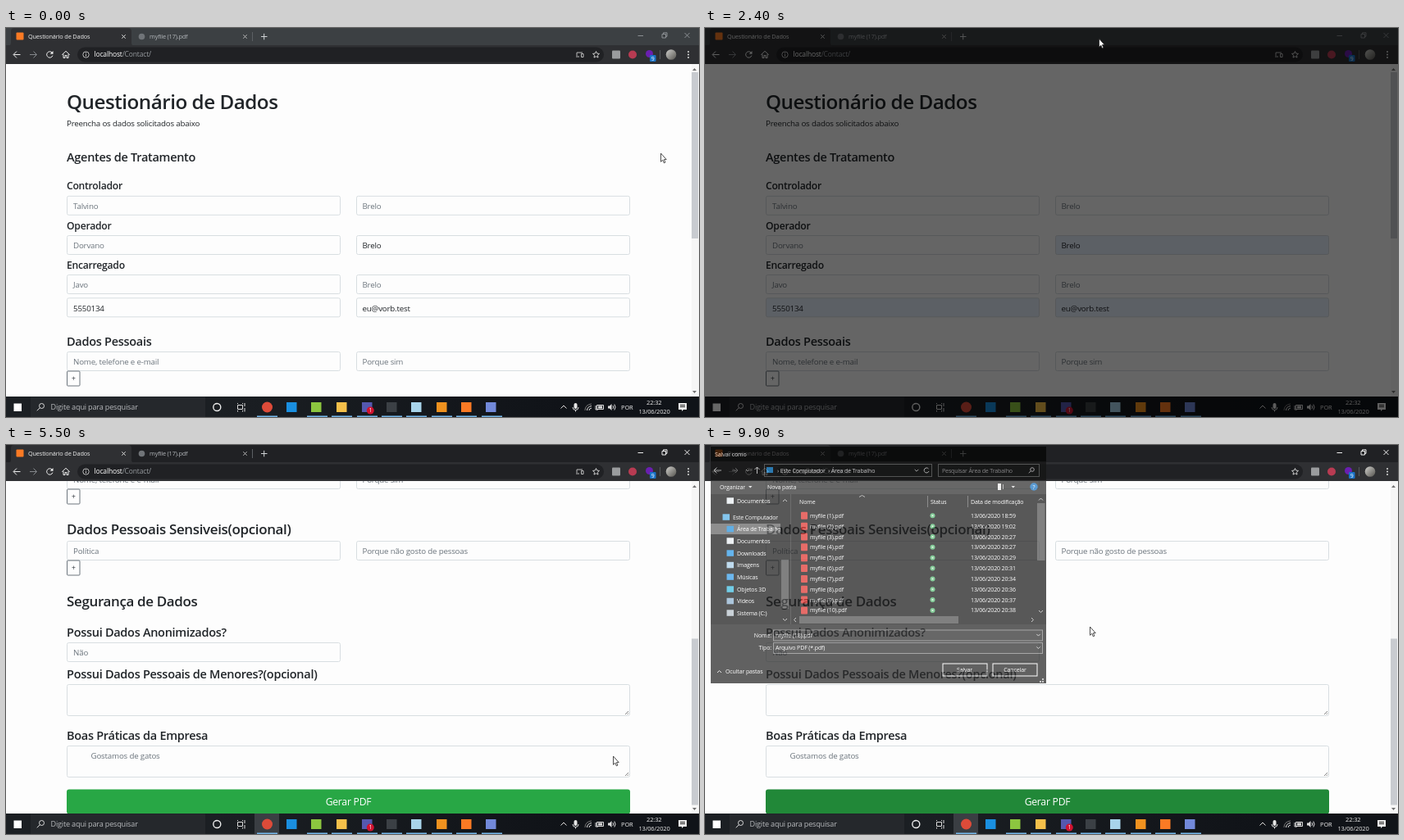
These frames come from a looping animation (845 px wide and 475 px high, 10 s). An HTML page:

```html
<!DOCTYPE html>
<html lang="pt">
<head>
<meta charset="utf-8">
<title>Questionário de Dados</title>
<style>
html, body { margin: 0; width: 100%; height: 100%; overflow: hidden; background: #fdfdfd; }
svg { display: block; width: 845px; height: 475px; }
text { font-family: "Open Sans", "Noto Sans", sans-serif; letter-spacing: -.02em; white-space: pre; }
.line { fill: none; stroke: currentColor; stroke-width: 1; }
.box { fill: #fdfdfd; stroke: #d8dee1; stroke-width: 1; }
</style>
</head>
<body>
<svg id="stage" viewBox="0 0 845 475"></svg>
<script>
const LOOP = 10000, STEP = 100;

// ---- drawing helpers ----
const rect = (x, y, w, h, fill, more = '') =>
  `<rect x="${x}" y="${y}" width="${w}" height="${h}" fill="${fill}" ${more}/>`;
const dot = (x, y, r, fill, more = '') => `<circle cx="${x}" cy="${y}" r="${r}" fill="${fill}" ${more}/>`;
const line = (d, color = '#ddd', more = '') => `<path class="line" d="${d}" color="${color}" ${more}/>`;
const shape = (d, fill, more = '') => `<path d="${d}" fill="${fill}" ${more}/>`;
const group = (id, body, more = '') => `<g id="${id}" ${more}>${body}</g>`;
// y is the middle of the text line
const text = (x, y, s, size, fill, more = '') => {
  const px = size * .985;
  return `<text x="${x}" y="${(y + px * .36).toFixed(2)}" font-size="${px.toFixed(2)}" fill="${fill}" ${more}>${s}</text>`;
};
const heading = (y, s, size) => text(74, y, s, size * .995, '#212529', 'font-weight="600"');
const cross = (x, y, r, color, more) => line(`M${x - r} ${y - r}l${2 * r} ${2 * r}m0 ${-2 * r}l${-2 * r} ${2 * r}`, color, more);
const chevron = (x, y, w, h, color) => line(`M${x - w} ${y - h / 2}l${w} ${h}l${w} ${-h}`, color);
const middle = 'text-anchor="middle"';

// ---- web page ----
const GREY = '#6c757d', DARK = '#212529';
const field = (col, y, s, auto) =>
  `<rect class="box${auto ? ' auto' : ''}" x="${col ? 427.5 : 74.5}" y="${y}" width="333" height="23" rx="2"/>` +
  text(col ? 434.5 : 82, y + 12.3, s, 9.9, auto ? DARK : GREY);
const pair = (y, a, b, autoA, autoB) => field(0, y, a, autoA) + field(1, y, b, autoB);
const plus = y => `<rect x="74.5" y="${y}" width="15.5" height="18" rx="1" fill="#fdfdfd" stroke="#6c757d"/>` +
  text(82.3, y + 9.3, '+', 8.7, '#343a40', middle);
const area = (y, s) => `<rect class="box" x="74.5" y="${y}" width="686" height="38" rx="2"/>` +
  text(103.5, y + 12, s, 9.9, GREY) + line(`M755 ${y + 36.5}l4-4m-1.5 4l1.5-1.5`, '#888', 'stroke-width=".7"');

const page = group('page',
  heading(90, 'Questionário de Dados', 24.7) +
  text(74, 116, 'Preencha os dados solicitados abaixo', 9.9, DARK) +
  heading(157.5, 'Agentes de Tratamento', 14.8) +
  heading(193, 'Controlador', 12.4) + pair(205.3, 'Talvino', 'Brelo') +
  heading(241.5, 'Operador', 12.4) + pair(253.5, 'Dorvano', 'Brelo', false, true) +
  heading(289.5, 'Encarregado', 12.4) + pair(301.5, 'Javo', 'Brelo') +
  pair(329.8, '5550134', 'eu@vorb.test', true, true) +
  heading(382.5, 'Dados Pessoais', 14.8) + pair(395.5, 'Nome, telefone e e-mail', 'Porque sim') + plus(419) +
  heading(468.3, 'Dados Pessoais Sensiveis(opcional)', 17.3) + pair(482.5, 'Política', 'Porque não gosto de pessoas') + plus(506) +
  heading(555.5, 'Segurança de Dados', 17.3) +
  heading(594, 'Possui Dados Anonimizados?', 14.8) + field(0, 606.5, 'Não') +
  heading(644.7, 'Possui Dados Pessoais de Menores?(opcional)', 14.8) + area(657.5, '') +
  heading(720, 'Boas Práticas da Empresa', 14.8) + area(732.5, 'Gostamos de gatos') +
  `<rect id="button" x="74" y="785.5" width="687" height="30" rx="3"/>` +
  text(417.5, 801, 'Gerar PDF', 12.4, '#fff', middle));

const scrollbar = rect(836, 44, 9, 406, '#f6f6f6') + `<rect id="thumb" x="836" width="8" height="203"/>` +
  shape('M837 52l2.5-3l2.5 3zM837 443l2.5 3l2.5-3z', '#707070');

// ---- browser frame ----
const arrow = (x, dir, color) => line(`M${x - 4} 32.5h8M${x + dir * .5} 28.5l${dir * 4} 4l${-dir * 4} 4`, color, 'stroke-width="1.3"');
const browser = `<rect id="strip" width="845" height="22"/>` + rect(0, 21, 845, 23, '#2f3033') +
  shape('M2 22q4 0 4-4V4q0-4 4-4H149q4 0 4 4v14q0 4 4 4z', '#2f3033') +
  group('favicon', rect(12.5, 5.5, 9, 9, '#fb7a24', 'rx="1"')) +
  text(27, 10.5, 'Questionário de Dados', 7.42, '#f0f0f0') + cross(143.5, 10.5, 2.2, '#ddd') +
  dot(165.5, 10.5, 3.8, '#707478') + text(175, 10.5, 'myfile (17).pdf', 7.42, '#b4b8bc') + cross(291.5, 10.5, 2.2, '#bbb') +
  line('M300.5 5v11', '#5c6064') + line('M311 10.5h7.5M314.7 6.8v7.5', '#d0d3d6') +
  group('controls', line('M770.5 9.5h6.5M800 7.5h4.5v4.5h-4.5zM801.5 7.5v-1.7h4.5v4.5h-1.5', 'currentColor', 'stroke-width=".9"') + cross(830.5, 9, 3, 'currentColor')) +
  arrow(13.5, -1, '#eee') + arrow(33, 1, '#85888c') +
  group('reload', line('M56.3 30.2a3.7 3.7 0 1 0 .6 3.4', '#eee', 'stroke-width="1.3"') + shape('M57.5 28v3.8h-3.8z', '#eee')) +
  group('stop', cross(53, 32.5, 3, '#eee', 'stroke-width="1.3"')) +
  line('M68.3 32.7l4.7-4.4l4.7 4.4M70 32v4.5h2v-3h2v3h2V32', '#eee', 'stroke-width="1.2"') +
  rect(87, 23.5, 642, 18, '#202124', 'rx="9"') +
  dot(97.5, 32.5, 3.7, 'none', 'stroke="#bbb"') + line('M97.5 32v2.5M97.5 30v1', '#ccc') +
  text(107.5, 32.3, '<tspan fill="#fff">localhost</tspan>/Contact/', 8.65, '#969a9e') +
  group('device', line('M696 34V30h7M695 35h4M701.5 31.5h2.5v4h-2.5z', '#bbb')) +
  line('M719.5 28.5l1.2 2.6l2.8.3l-2.1 1.9l.6 2.8l-2.5-1.4l-2.5 1.4l.6-2.8l-2.1-1.9l2.8-.3z', '#ccc', 'stroke-width=".9"') +
  rect(739, 27.5, 10, 10, '#9a9c9e', 'rx="1"') + dot(764, 32.5, 5, '#b83b52') +
  dot(784.5, 31.5, 4.5, '#6a1fb0') + rect(785, 33, 7.5, 8, '#1a73c8', 'rx="1"') + text(788.7, 37.2, '9', 7, '#fff', middle) +
  line('M797.5 27v11', '#55585b') + dot(811, 32.5, 6.3, 'url(#photo)') +
  [29, 32.5, 36].map(y => dot(832, y, 1, '#ddd')).join('');

// ---- taskbar ----
const apps = [[348, '#1a8fe0'], [378, '#8cc63f', 1], [409, '#f5c04a', 1], [440, '#5558af', 1], [470, '#3b4045', 1],
  [500, '#a8d4ea'], [531, '#f0921f', 1], [561, '#fb7a24'], [591, '#7289da', 1]];
const taskbar = rect(0, 450, 845, 25, 'url(#bar)') + rect(9.5, 458.5, 9.5, 9.5, '#fff') +
  rect(30, 450.5, 213, 24.5, '#25282c') + dot(43.5, 461.5, 3, 'none', 'stroke="#ddd"') + line('M41.3 463.8l-3.5 3.5') +
  text(54.5, 463, 'Digite aqui para pesquisar', 9.25, '#b8babd') +
  dot(257.3, 463, 4.5, 'none', 'stroke="#eee" stroke-width="1.4"') +
  line('M282.5 460.5h6v5h-6zM282.5 458v1M288.5 458v1M282.5 467v1.5M288.5 467v1.5M291 458v4M291 464v4.5', '#ddd') +
  group('active', rect(303, 450, 30, 25, '#3a3e43')) +
  dot(318.5, 463, 6.5, '#dd4b39') +
  apps.map(([x, c, late]) => rect(x - 6, 457, 12.5, 12, c, late ? 'class="late"' : '')).join('') +
  [306, 367, 397, 428, 458, 488, 519, 549, 580].map(x => rect(x, 473.5, 25, 1.5, '#76b9ed')).join('') +
  dot(444.3, 467, 4.5, '#d1122f') + text(444.3, 467, '1', 7, '#fff', middle) +
  line('M676.5 464.5l3.5-3.5l3.5 3.5') +
  rect(692.5, 458, 4, 7, '#e6e6e6', 'rx="2"') + line('M691 463q0 3.5 3.5 3.5t3.5-3.5M694.5 466.5v2') +
  line('M706 467q0-7 8-8', '#777') + line('M708.5 467q0-4.5 5.5-5.5M711 467q0-2.5 3-3') +
  line('M720.5 460.5h8v5h-8z') + rect(722, 461.5, 5, 3, '#ddd') + line('M719 461v5h3') +
  shape('M734 461.5h2l2.5-2.5v8l-2.5-2.5h-2z', '#ddd') + line('M740 461q1.5 2 0 4M741.8 459.5q2.5 3.5 0 7') +
  text(757.3, 463, 'POR', 7.6, '#eee', middle) + text(790.3, 457.2, '22:32', 7.6, '#eee', middle) +
  text(790.5, 468, '13/06/2020', 7.6, '#eee', middle) +
  shape('M820 458h10v8h-4l-2 2v-2h-4z', '#eee') + line('M822 460.5h6M822 462.5h6', '#222', 'stroke-width=".7"');

// ---- capture toolbar ----
const snip = group('snip', rect(348, 0, 149, 29.5, '#202020') + rect(348, 0, 30, 29.5, '#0078d7') +
  `<rect id="closeHot" x="467" width="30" height="29.5" fill="#e81123"/>` +
  line('M358.5 11.5h9.5v7.5h-9.5z', '#fff', 'stroke-dasharray="2 1"') + line('M366 19.5h4M368 17.5v4', '#fff') +
  line('M396.5 17.5a4.5 4.5 0 1 1 1-3M394 18l4 2', '#fff') +
  line('M418.5 10.5h6.5v7h-6.5zM427 12v8h-7', '#fff') +
  line('M447.5 13v-2h2m5 0h2v2m0 4v2h-2m-5 0h-2v-2M449.5 13h5v4h-5z', '#fff') +
  line('M467.5 8v13', '#666') + cross(482.3, 14.8, 3.6, '#fff'));

// ---- save dialog ----
const small = (x, y, s, more = '') => text(x, y, s, 7.15, '#fff', more);
const frame = (x, y, w, h, color = '#8a8a8a') => rect(x + .5, y + .5, w, h, 'none', `stroke="${color}"`);

const opening = group('opening',
  rect(5, 0, 412.5, 20, '#0a0a0a') + dot(15, 10, 4, '#dd4b39') + small(23.5, 10, 'Salvar como') + cross(407.5, 10, 3, '#fff') +
  rect(5, 20, 412.5, 40, '#fdfdfd') + rect(5, 60, 97, 159.5, 'rgba(16,16,16,.94)') +
  rect(102, 60, 2.5, 159.5, '#fdfdfd') + rect(104.5, 60, 313, 159.5, 'rgba(16,16,16,.87)') +
  rect(92, 140, 9, 61, '#4d4d4d') + rect(407, 60, 10, 138, '#222') + rect(407, 77, 10, 64, '#555') +
  rect(104.5, 208, 313, 11.5, '#202020') + rect(114, 209, 196, 9.5, '#555') +
  small(114.5, 68, 'Nome') + small(275, 68, 'Status') + small(324.5, 68, 'Data de modificação') + small(413, 68, 'T') +
  line('M271.5 62v14M320.5 62v14M409.5 62v14', '#666') + line('M188 62.5l3.5-2l3.5 2', '#aaa') +
  small(260, 90, 'Trabalhando nisso...', middle) +
  line('M94 67.5l2.5-2.5l2.5 2.5M94 213l2.5 2.5l2.5-2.5M111 211l-2.5 2.5l2.5 2.5M411 211l2.5 2.5l-2.5 2.5', '#bbb') +
  rect(26.5, 176, 7, 10, '#f4f4f4') + small(38, 181, 'tg') + small(33.5, 200.5, 'NuvemLar') +
  rect(26, 211, 8.5, 8.5, '#f7cf73') + small(38.5, 215.5, 'Anexos') +
  rect(5, 219.5, 412.5, 40.5, '#fdfdfd') + rect(5, 260, 412.5, 32, 'rgba(8,8,8,.72)') +
  rect(11.5, 271, 71.5, 13, '#fff') + rect(290.5, 268, 54, 16, '#fff') + rect(352, 268, 55, 16, '#fff') + rect(406, 281, 11, 10, '#fff') +
  frame(5, 0, 412, 292, '#8a9aa8'));

const places = [[68, 39, 'Documentos', '#e8eef2'], [88, 34, 'Este Computador', '#5ab4e8'], [102.5, 39, 'Área de Trabalho', '#2a93dc'],
  [117, 39, 'Documentos', '#e8eef2'], [132, 39, 'Downloads', '#2f9be8'], [146.5, 39, 'Imagens', '#a9cfe8'],
  [161, 39, 'Músicas', '#3aa0ea'], [176, 39, 'Objetos 3D', '#41bde0'], [190.5, 39, 'Vídeos', '#8fb2d0'], [205, 39, 'Sistema (C:)', '#b9c4cc']];
const times = ['18:59', '19:02', '20:27', '20:27', '20:29', '20:31', '20:34', '20:36', '20:37', '20:38'];
const files = times.map((clock, i) => {
  const y = 86.3 + i * 12.85;
  return rect(117, y - 4.5, 8, 9, '#e03a35', 'rx="1"') + small(128, y, `myfile (${i + 1}).pdf`) +
    dot(277.5, y, 3, '#5fbf7a') + dot(277.5, y, 1, '#e8f5ea') + small(324, y, `13/06/2020 ${clock}`);
}).join('');

const dialog = group('dialog',
  rect(7, 2, 409, 289, '#2b2b2b') + rect(7, 2, 409, 18, '#050505') + rect(7, 20, 409, 23, '#151515') +
  small(12, 11, 'Salvar como') + group('dialogClose', cross(405.5, 11, 3, '#fff')) +
  line('M20 31h-9m3.5-3.5l-3.5 3.5l3.5 3.5', '#ccc') + line('M33 31h7m-3-3l3 3l-3 3', '#777') +
  chevron(52, 31, 2, 2, '#aaa') + line('M63.5 35v-8m-3 3l3-3l3 3', '#eee') +
  frame(72, 23, 204, 15, '#666') + rect(75, 27, 8, 7, '#2a93dc') +
  small(88, 31, '› Este Computador&#160; › Área de Trabalho') + chevron(258, 31, 2.3, 2.3, '#ccc') +
  line('M272.5 29a3 3 0 1 0 .5 3', '#ddd') + frame(284, 23, 123, 15, '#666') +
  text(289, 31, 'Pesquisar Área de Trabalho', 7.15, '#aaa') + dot(399, 30, 2.3, 'none', 'stroke="#ccc"') + line('M397.3 31.8l-2.5 2.5', '#ccc') +
  rect(7, 43, 409, 17, '#333') + small(18, 51, 'Organizar') + shape('M53 50h4.5l-2.2 2.5z', '#ddd') + small(76, 51, 'Nova pasta') +
  rect(357, 47, 4, 8, '#eee') + line('M363.5 48v6', '#aaa') + shape('M373.5 50h4.5l-2.2 2.5z', '#ddd') +
  dot(401, 51, 4.7, '#2479c4') + small(401, 51, '?', middle) +
  rect(7, 60, 409, 159, '#202020') + rect(7, 96, 85, 13, '#686868') +
  `<g clip-path="url(#tree)">` + places.map(([y, x, s, c]) => rect(x - 12.5, y - 3.7, 8.5, 7.5, c) + small(x, y, s)).join('') + '</g>' +
  rect(93, 140, 9, 60, '#555') + line('M95 69l2.5-2.5l2.5 2.5M95 212l2.5 2.5l2.5-2.5', '#bbb') + line('M104.5 60v159', '#3c3c3c') +
  small(115, 69, 'Nome') + small(275, 69, 'Status') + small(324, 69, 'Data de modificação') +
  line('M271.5 62v14M320.5 62v14', '#666') + line('M188 63.5l3.5-2l3.5 2', '#aaa') + files +
  rect(405, 71, 9.5, 70, '#555') + rect(115, 209, 194, 9, '#555') +
  line('M407 67.5l2.5-2.5l2.5 2.5M407 202l2.5 2.5l2.5-2.5M111 211l-2.5 2.5l2.5 2.5M398 211l2.5 2.5l-2.5 2.5', '#bbb') +
  small(81, 232, 'Nome:', 'text-anchor="end"') + small(81, 247.5, 'Tipo:', 'text-anchor="end"') +
  rect(83, 226, 328, 13, '#333') + rect(83, 241.5, 328, 13, '#333') + frame(83, 225.5, 328, 13) + frame(83, 241, 328, 13) +
  small(86, 232, 'myfile (18).pdf') + small(86, 247.7, 'Arquivo PDF (*.pdf)') +
  chevron(406.5, 232, 2.2, 2.2, '#ccc') + chevron(406.5, 247.5, 2.2, 2.2, '#ccc') + `<path id="caret" d="M134.5 228v9" stroke="#fff" stroke-width=".8"/>` +
  line('M15 278l2.5-2.5l2.5 2.5', '#ddd') + small(25, 276.5, 'Ocultar pastas') +
  frame(289.5, 266.5, 54, 15, '#fff') + small(316.5, 274.3, 'Salvar', middle) +
  frame(350.5, 266.5, 54, 15, '#fff') + small(378, 274.3, 'Cancelar', middle) +
  shape('M408 288h2v2h-2zm3 0h2v2h-2zm0-3h2v2h-2z', '#bbb'));

// ---- pointers ----
const ink = 'stroke="#222" stroke-width=".8" stroke-linejoin="round"';
const pointers = group('arrow', shape('M.5 0V10.3L2.8 8.2L4.3 11.8L5.9 11.1L4.4 7.6H7.2Z', '#fff', ink)) +
  group('cross', line('M-8 0H8M0-8V8', '#fff')) +
  group('hand', shape('M0 1q1.5-2 2.7 0v4.3l5.3 1.2v4l-1.5 3.5H1.3L-2 9.5q-.5-2 2 -.8z', '#fff', ink));

document.getElementById('stage').innerHTML =
  `<defs><clipPath id="view"><rect y="44" width="836" height="406"/></clipPath>
   <clipPath id="tree"><rect x="7" y="60" width="85" height="159"/></clipPath>
   <linearGradient id="bar"><stop offset=".3" stop-color="#1b1f23"/><stop offset=".8" stop-color="#101318"/></linearGradient>
   <linearGradient id="photo" x2="1" y2="1"><stop stop-color="#d0d0cc"/><stop offset="1" stop-color="#55534e"/></linearGradient></defs>` +
  rect(0, 0, 845, 475, '#fdfdfd') + `<g clip-path="url(#view)">${page}</g>` + scrollbar + browser + taskbar +
  opening + dialog + group('dim', rect(0, 0, 845, 475, '#000')) + snip + pointers;

// ---- motion: [ms, values...] ----
const scrolls = [[3200, 0], [3400, 35], [3700, 140], [3800, 140], [4200, 270], [4400, 270], [4500, 314], [4900, 365]];
const moves = [[0, 798, 153], [800, 798, 153], [1100, 520, 12], [1300, 565, 0], [1600, 565, 0], [1800, 509, 0], [1900, 509, 0],
  [2200, 480, 13], [2500, 480, 13], [2900, 843, 110], [3200, 843, 114]];
const leaves = [[4900, 843, 296], [5500, 740, 380], [5900, 480, 415], [6000, 480, 415], [6600, 437, 435], [7100, 437, 435],
  [7700, 440, 398], [7900, 440, 398], [8100, 454, 365], [8700, 454, 365], [9100, 469, 222]];
const dims = [[0, 0], [400, .6], [2500, .6], [2900, 0]];

function at(table, t) {
  const i = table.findIndex(row => row[0] > t);
  if (i === 0) return table[0].slice(1);
  if (i < 0) return table[table.length - 1].slice(1);
  const a = table[i - 1], b = table[i], k = (t - a[0]) / (b[0] - a[0]);
  return a.slice(1).map((v, n) => v + (b[n + 1] - v) * k);
}

const parts = {};
document.querySelectorAll('#stage [id]').forEach(el => parts[el.id] = el);
const set = (id, name, value) => parts[id].setAttribute(name, value);
const show = (id, on) => parts[id].style.display = on ? '' : 'none';
const autos = document.querySelectorAll('.auto'), late = document.querySelectorAll('.late');

function draw(t) {
  const within = (a, b) => t >= a && t < b;
  const [scroll] = at(scrolls, t), [dim] = at(dims, t);
  const dragging = within(3200, 5000), focused = within(3200, 7700) || t >= 9900;
  const loading = within(6800, 7700), last = t >= 9900;

  set('page', 'transform', `translate(0 ${-scroll})`);
  set('thumb', 'y', 54 + scroll / 2);
  set('thumb', 'fill', dragging ? '#787878' : '#c8cbd0');
  set('strip', 'fill', focused ? '#202124' : '#3c4043');
  parts.controls.style.color = focused ? '#eee' : '#8c9094';
  show('active', t >= 3200);
  show('favicon', !loading);
  show('reload', !loading);
  show('stop', loading);
  show('device', t < 6800);
  autos.forEach(el => el.style.fill = dim ? '#e8f0fe' : '#fdfdfd');
  late.forEach(el => el.style.display = within(7800, 7900) ? 'none' : '');

  set('dim', 'opacity', dim);
  show('snip', within(200, 2400));
  show('closeHot', within(2100, 2400));

  show('opening', within(7700, 7900));
  set('opening', 'opacity', t < 7800 ? .5 : 1);
  show('dialog', t >= 7900);
  set('dialog', 'opacity', last ? .74 : 1);
  set('dialog', 'transform', last ? '' : 'translate(211.5 146.5) scale(1.01) translate(-211.5 -146.5)');
  show('dialogClose', !last);
  show('caret', within(7900, 8500) || within(9000, 9600));

  const [x, y] = dragging && t < 4900 ? [843, 114 + scroll / 2] : at(t < 4900 ? moves : leaves, t);
  const over = within(5500, 7700) && y > 420;
  const kind = within(500, 2100) ? 'cross' : over ? 'hand' : 'arrow';
  for (const id of ['arrow', 'cross', 'hand']) show(id, id === kind);
  set(kind, 'transform', `translate(${Math.round(x)} ${Math.round(y)})`);

  set('button', 'fill', within(6800, 7000) ? '#1e7e34' : over || t >= 6800 ? '#218838' : '#28a745');
  set('button', 'stroke', loading ? 'rgba(40,167,69,.5)' : 'none');
  set('button', 'stroke-width', 3);
}

const start = performance.now();
function tick() {
  const t = (performance.now() - start) % LOOP;
  draw(Math.floor(t / STEP) * STEP);
  requestAnimationFrame(tick);
}
tick();
</script>
</body>
</html>
```
